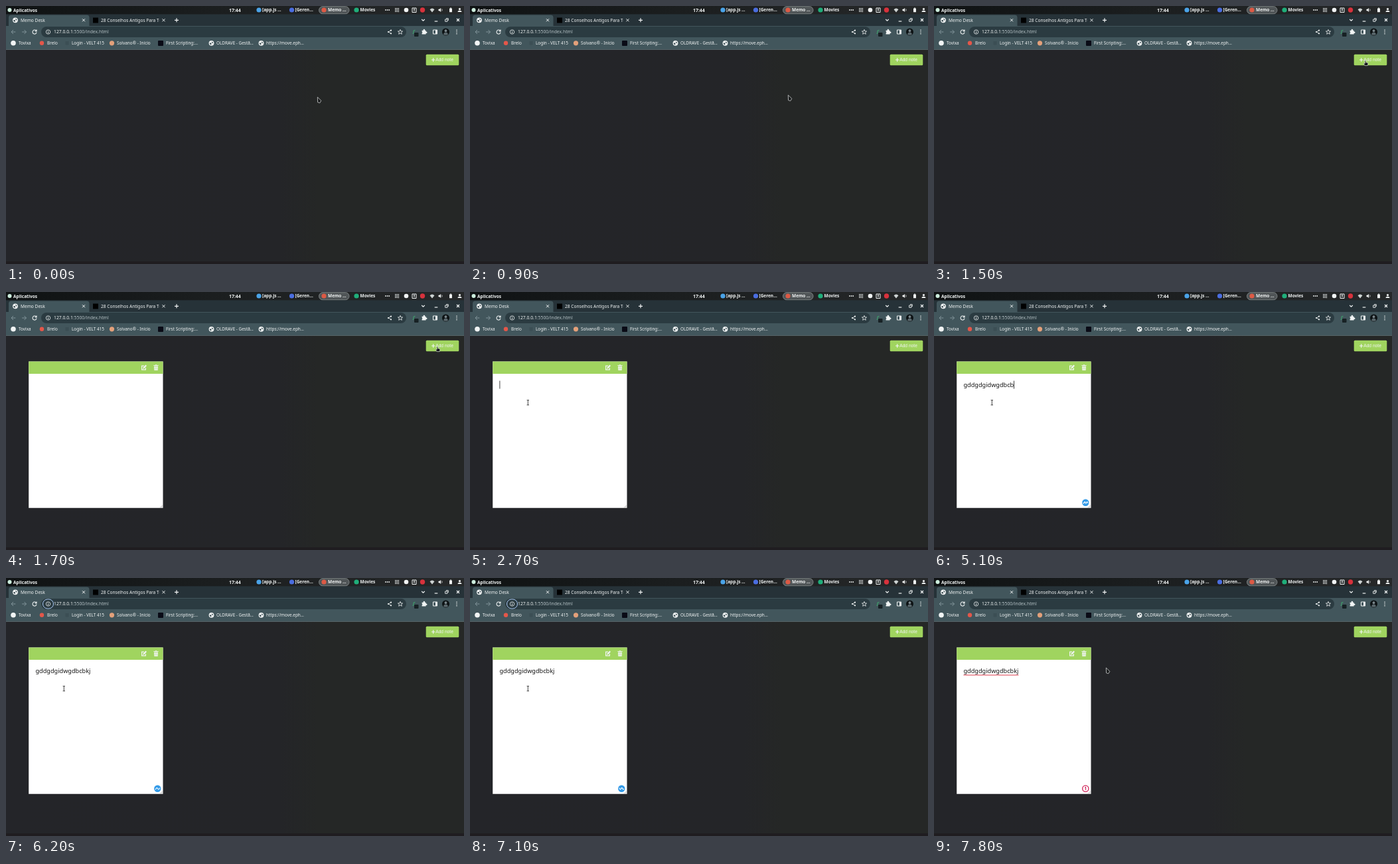
Recreate the animation shown at these times as an HTML page with a canvas. Size 690 by 388 pixels, loop 8 s.

```html
<!DOCTYPE html>
<html lang="pt">
<head>
<meta charset="utf-8">
<title>Memo Desk</title>
<style>
html, body { margin: 0; width: 100%; height: 100%; overflow: hidden; background: #242528; }
canvas { display: block; width: 690px; height: 388px; }
</style>
</head>
<body>
<canvas></canvas>
<script>
const W = 690, H = 388, LOOP = 8000;
const canvas = document.querySelector('canvas');
const c = canvas.getContext('2d');
const dpr = window.devicePixelRatio || 1;
canvas.width = W * dpr;
canvas.height = H * dpr;

const UI = '"Noto Sans", "Open Sans", sans-serif';
const WHITE = '#f1f4f4', GREEN = '#a0d45f', BAR = '#42565c';

function box(x, y, w, h, fill, r = 0) {
  c.fillStyle = fill;
  c.beginPath();
  c.roundRect(x, y, w, h, r);
  c.fill();
}
function outline(x, y, w, h, color, r) {
  c.strokeStyle = color;
  c.lineWidth = 1;
  c.beginPath();
  c.roundRect(x, y, w, h, r);
  c.stroke();
}
function disc(x, y, r, fill) {
  c.fillStyle = fill;
  c.beginPath();
  c.arc(x, y, r, 0, 7);
  c.fill();
}
function ring(x, y, r, color, width = 1) {
  c.strokeStyle = color;
  c.lineWidth = width;
  c.beginPath();
  c.arc(x, y, r, 0, 7);
  c.stroke();
}
function text(str, x, y, size = 6.5, color = WHITE, weight = 400, family = UI) {
  c.font = `${weight} ${size}px ${family}`;
  c.fillStyle = color;
  c.fillText(str, x, y);
  return x + c.measureText(str).width;
}
function across(...stops) {
  const g = c.createLinearGradient(0, 0, W, 0);
  for (const [at, color] of stops) g.addColorStop(at, color);
  return g;
}
// Path data is relative to the icon centre.
function icon(x, y, d, { stroke = WHITE, fill, width = 1 } = {}) {
  const p = new Path2D(d);
  c.save();
  c.translate(x, y);
  if (fill) { c.fillStyle = fill; c.fill(p); }
  if (stroke) { c.strokeStyle = stroke; c.lineWidth = width; c.stroke(p); }
  c.restore();
}
const solid = (x, y, d, fill = WHITE) => icon(x, y, d, { fill, stroke: null });
const CROSS = 'M-2-2L2 2M2-2L-2 2';

function globe(x, y) {
  disc(x, y, 3.9, WHITE);
  solid(x, y, 'M-2.8-.4L-.8-.2.2 1-.8 2.6-2.2 1.6ZM0-2.4L2-1.6 2.6.2 1 0Z', '#3c4d53');
}

function systemBar() {
  box(0, 0, W, 12.5, across([0, '#0f1213'], [.45, '#1b1e1f'], [1, '#262829']));
  disc(5.5, 6, 3, '#cdeedd');
  text('Aplicativos', 11, 8.5, 6.6, WHITE, 700);
  text('17:44', 336, 8.5, 6.9, WHITE, 700);
  box(471.5, .8, 45.5, 11, '#505557', 5.5);
  outline(471.5, .8, 45.5, 11, '#7d8384', 5.5);
  const tasks = [
    [381, '#4aa3e8', '[app.js …', 386], [430.5, '#4a6de0', '[Geren…', 435.5],
    [479, '#dd5a45', 'Memo …', 485], [528, '#1fae7a', 'Movies', 533.5]
  ];
  for (const [x, color, label, tx] of tasks) {
    disc(x, 6, 3.6, color);
    text(label, tx, 8.3, 6.5, WHITE, 600);
  }
  for (let i = 0; i < 3; i++) {
    disc(572 + i * 2.6, 6, .9, WHITE);
    for (let j = 0; j < 3; j++) box(586 + i * 2.3, 3 + j * 2.3, 1.5, 1.5, '#d8dcdc');
  }
  disc(603, 6, 3.3, WHITE);
  icon(615, 6, 'M-3-3H3V3.5H-3ZM0-1.5V2M-1-1.2H1');
  disc(627.5, 6, 3.7, '#d8323c');
  solid(642, 6, 'M0 3.5L-3.5-.8Q0-4 3.5-.8Z', '#cdd2d2');
  solid(654.5, 6, 'M-3-1.2H-1.4L.6-3V3L-1.4 1.2H-3Z');
  icon(655, 6, 'M1.5-1.6Q2.8 0 1.5 1.6', { width: .7 });
  box(668, 3.6, 4, 5.7, WHITE, .5);
  box(669.2, 2.6, 1.6, 1.2, WHITE);
  disc(683.5, 4.6, 1.6, WHITE);
  solid(683.5, 6, 'M-3 3Q-2.8.7 0 .7T3 3Z');
}

function tabs() {
  box(0, 12.5, W, 18, '#263238');
  box(4, 13.5, 121.5, 18, BAR, [4, 4, 0, 0]);
  globe(14, 21.3);
  text('Memo Desk', 22, 23.7, 6.6);
  icon(117, 21.3, CROSS);
  box(131, 17.5, 8, 8, '#000');
  c.save();
  c.beginPath();
  c.rect(140, 14, 90.5, 16);
  c.clip();
  text('28 Conselhos Antigos Para Todos', 143, 23.7, 6.6);
  c.restore();
  icon(237.5, 21.3, CROSS);
  icon(257, 21.3, 'M-3 0H3M0-3V3', { width: 1.2 });
  icon(628.5, 21, 'M-2.3-1L0 1.2 2.3-1', { width: 1.2 });
  icon(648, 22, 'M-2.3 1H2.3', { width: 1.2 });
  icon(664, 21, 'M-2.3-1H1V2.3H-2.3ZM-1-2.3H2.3V1', { width: .9 });
  icon(681, 21, CROSS, { width: 1.2 });
}

function toolbar(focus) {
  box(0, 30, W, 35, BAR);
  box(0, 65, W, 1, '#566468');
  box(53, 31, 550, 16, '#2b3b41', 8);
  const dim = { stroke: '#81949a' };
  icon(11, 39, 'M3.3 0H-3M0-3L-3 0 0 3', dim);
  icon(27.5, 39, 'M-3.3 0H3M0-3L3 0 0 3', dim);
  icon(43, 39, 'M2.4-1.8A3 3 0 1 0 3 .6M3-3.4V-1H.6', { width: 1.1 });
  ring(63.5, 39, 3.2, WHITE, .8);
  icon(63.5, 39, 'M0-.4V2M0-1.9V-1.1', { width: .9 });
  if (focus) outline(55.5, 32, 16, 14, '#a9c8f4', 7);
  const end = text('127.0.0.1', 72, 41.4, 6.8);
  text(':5500/index.html', end, 41.4, 6.8, '#b4c0c4');

  icon(578, 39, 'M2-2.3L-2 0 2 2.3', { width: .8 });
  for (const [x, y] of [[580, 36.7], [576, 39], [580, 41.3]]) disc(x, y, 1.1, WHITE);
  icon(594, 39, 'M0-3.6L1-1.1 3.6-1 1.6.7 2.3 3.3 0 1.8-2.3 3.3-1.6.7-3.6-1-1-1.1Z', { width: .8 });
  icon(614.5, 39, 'M-2 2.2H-.5V-2L2-2.5', { stroke: '#3fa86c' });
  box(615, 40, 6.5, 6, '#172124', 1);
  solid(630, 39, 'M-3.4-2.2H-1.2A1.3 1.3 0 1 1 1-2.2H2.6V-.4A1.3 1.3 0 1 1 2.6 1.9V3.6H-3.4V1.7A1.2 1.2 0 0 0-3.4-.5Z');
  icon(646.5, 39, 'M-3-3H3V3H-3Z');
  box(647, 36, 2.8, 6, WHITE);
  disc(662.5, 39, 5.5, '#0d1214');
  disc(662.5, 37.2, 1.9, '#79858a');
  solid(662.5, 39, 'M-3.3 3.9Q-3 .6 0 .6T3.3 3.9Q0 5.8-3.3 3.9Z', '#59666b');
  for (const y of [36.3, 39, 41.7]) disc(679, y, .8, WHITE);

  disc(11, 55.8, 3.8, WHITE);
  disc(54, 55.8, 3.2, '#e4574a');
  box(89.5, 53, 5, 5.5, '#3b4e54');
  disc(159.5, 55.8, 3.6, '#e3a07a');
  box(229, 52, 8, 8, '#0a0b16', 1);
  globe(309.5, 55.8);
  globe(384.5, 55.8);
  const links = [
    ['Tovixa', 19], ['Brelo', 62], ['Login - VELT 415', 99], ['Solvano® - Início', 167],
    ['First Scripting:…', 241], ['OLDRAVE - Gestã…', 317], ['https://move.eph…', 392]
  ];
  for (const [label, x] of links) text(label, x, 58.2, 6.4);
}

function page() {
  box(0, 65, W, H - 65, across([0, '#242529'], [.6, '#242528'], [.68, '#252726'], [1, '#252726']));
  box(0, 384, W, 4, '#1f1d20');
  box(632.7, 72.7, 49.6, 16.6, GREEN, 1.5);
  icon(643.7, 81, 'M-2.7 0H2.7M0-2.7V2.7', { width: 1.2 });
  text('Add note', 647.2, 83.4, 6.67, WHITE, 400, '"Liberation Sans", Arial, sans-serif');
}

const WORD = 'gddgdgidwgdbcbkj';
const KEYS = [3600, 3700, 3800, 3900, 4100, 4200, 4400, 4500,
  4600, 4700, 4800, 4900, 5000, 5100, 5400, 5500];
const CLICK = 2700, HELPER = 3000, BLUR = 6000, CHECKED = 7200;

function note(t) {
  box(34.2, 104.6, 202.3, 220.2, '#fff');
  box(34.2, 104.6, 202.3, 18.4, GREEN);
  icon(208, 113.5, 'M0-2.4H-3.4V3.4H2.4V.6', { width: 1.2 });
  solid(208, 113.5, 'M2.4-4L4-2.4.2 1.5-1.8 2-1.3 0Z');
  solid(226, 113.5, 'M-3.6-3.5H-1.3L-.8-4.2H.8L1.3-3.5H3.6V-2.4H-3.6ZM-3-1.8H3L2.7 4.2H-2.7Z');
  icon(226, 113.5, 'M-1.2-.8V3M1.2-.8V3', { stroke: GREEN, width: .6 });
  icon(234.4, 322.8, 'M-2.2 1.5L1.5-2.2M-.3 1.5L1.5-.3', { stroke: '#888', width: .6 });

  const typed = KEYS.filter(k => k <= t);
  const end = text(WORD.slice(0, typed.length), 44.5, 142.7, 9.15, '#161616');
  const last = typed.at(-1) ?? CLICK;
  const blinkOn = Math.floor((t - last) / 500) % 2 === 0;
  if (t >= CLICK && t < BLUR && blinkOn) box(end, 133.5, .8, 12, '#111');

  if (t >= CHECKED) {
    box(44.5, 145.4, end - 44.5, 1, '#d93a4a');
    ring(228.3, 316.7, 4.6, '#cf1f55', 1.3);
    text('1', 226.3, 319.3, 7, '#cf1f55', 700);
  } else if (t >= HELPER) {
    disc(228.3, 316.7, 5.2, '#349be8');
    wave(228.3, 316.7, t / 1000);
  }
}

function wave(x, y, s) {
  const pitch = 1.5 + .35 * Math.cos(s * 2.4);
  c.beginPath();
  for (let i = -3.6; i <= 3.6; i += .3) c.lineTo(x + i, y + 1.15 * Math.sin(i * pitch + s * 5));
  c.strokeStyle = '#fff';
  c.lineWidth = 1.1;
  c.stroke();
}

// Pointer stops: time, x, y; it rests between stops at the same place.
const STOPS = [
  [0, 469.3, 137], [800, 469.3, 137], [1500, 650, 82], [1800, 650, 82],
  [1900, 592, 100], [2000, 502, 119], [2100, 502, 119], [2200, 215, 151],
  [2500, 215, 151], [2600, 110, 164], [2700, 87.3, 166.3], [7300, 87.3, 166.3],
  [7800, 259.3, 135], [LOOP, 259.3, 135]
];

function pointer(t) {
  const i = STOPS.findIndex(s => s[0] > t);
  const [t0, x0, y0] = STOPS[i - 1], [t1, x1, y1] = STOPS[i];
  const u = (t - t0) / (t1 - t0), e = u * u * (3 - 2 * u);
  const x = x0 + (x1 - x0) * e, y = y0 + (y1 - y0) * e;
  if (x > 633 && y < 89) {
    icon(x, y, 'M-.8.2Q0-.8.8.2V2.8L3.8 3.6Q4.4 5 3.2 7.6H-.8L-2.8 4.8Q-2.2 3.6-.8 4.4Z', { fill: '#15181a', width: .6 });
  } else if (x < 236 && t >= 1700) {
    icon(x, y, 'M-1.7-3.6H1.7M0-3.6V3.6M-1.7 3.6H1.7', { stroke: '#333', width: .9 });
  } else {
    icon(x, y, 'M0 0L5.6 5.4 3.4 8.8 .3 7.8Z', { stroke: '#d0d2d2', fill: '#1b1d1e', width: .8 });
  }
}

function frame(now) {
  const t = Math.floor(now % LOOP / 100) * 100;
  c.setTransform(dpr, 0, 0, dpr, 0, 0);
  page();
  systemBar();
  tabs();
  toolbar(t >= BLUR && t < CHECKED);
  if (t >= 1700) note(t);
  pointer(t);
  requestAnimationFrame(frame);
}
requestAnimationFrame(frame);
</script>
</body>
</html>
```
